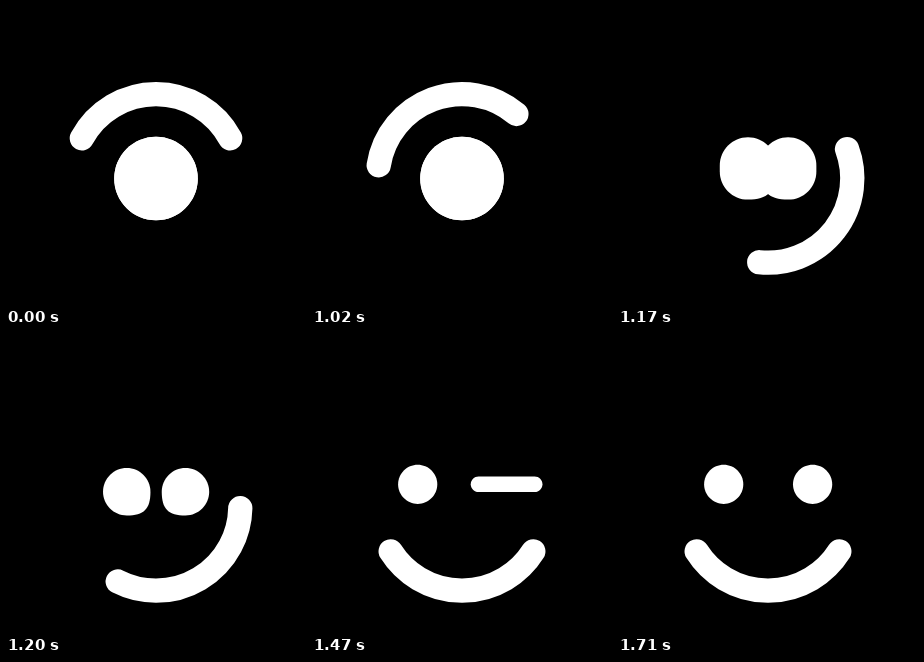
Write an HTML page that moves like this. It is 300 by 300 pixels and loops after 2.7 s.

```html
<!DOCTYPE html>
<html lang="en">
<head>
<meta charset="utf-8">
<title>Smile and wink</title>
<style>
  html, body { margin: 0; width: 100%; height: 100%; overflow: hidden; background: #000; }
  svg { display: block; width: 100%; height: 100%; }
</style>
</head>
<body>
<svg viewBox="0 0 300 300">
  <path id="arc" fill="none" stroke="#fff" stroke-width="24.3" stroke-linecap="round"/>
  <path id="left" fill="#fff"/>
  <path id="right" fill="#fff"/>
</svg>
<script>
const LOOP = 2700, STEP = 30;
const CX = 150, CY = 172.4, RADIUS = 84.3;
const ROUND = 0.552;

const [arc, left, right] = ['arc', 'left', 'right'].map(id => document.getElementById(id));

const span = (t, a, b) => Math.min(1, Math.max(0, (t - a) / (b - a)));
const mix = (a, b, p) => a + (b - a) * p;
const smooth = p => p * p * (3 - 2 * p);
const easeOut = (p, n) => 1 - Math.pow(1 - p, n);
const bump = (t, a, b) => Math.sin(Math.PI * span(t, a, b));

function bezier(x1, y1, x2, y2) {
  const at = (s, a, b) => 3 * (1 - s) * (1 - s) * s * a + 3 * (1 - s) * s * s * b + s * s * s;
  return x => {
    if (x <= 0 || x >= 1) return x <= 0 ? 0 : 1;
    let lo = 0, hi = 1;
    for (let i = 0; i < 30; i++) {
      const mid = (lo + hi) / 2;
      if (at(mid, x1, x2) < x) lo = mid; else hi = mid;
    }
    return at(lo, y1, y2);
  };
}

const swing = bezier(0.8, -0.55, 0.11, 1);

// Degrees run clockwise from the top.
function onArc(deg) {
  const a = deg * Math.PI / 180;
  return `${CX + RADIUS * Math.sin(a)} ${CY - RADIUS * Math.cos(a)}`;
}

function arcPath(turn, half) {
  return `M${onArc(turn - half)}A${RADIUS} ${RADIUS} 0 0 1 ${onArc(turn + half)}`;
}

// A pill whose lower inner corner can bulge; side is 1 for the left eye, -1 for the right.
function eyePath(cx, cy, rx, ry, bulge, side) {
  const r = Math.min(rx, ry), sx = rx - r, sy = ry - r;
  const k = ROUND * r, q = (ROUND + bulge) * r;
  const p = (x, y) => `${cx + side * x} ${cy + y} `;
  return 'M' + p(-sx, -ry) + 'L' + p(sx, -ry) +
    'C' + p(sx + k, -ry) + p(rx, -sy - k) + p(rx, -sy) + 'L' + p(rx, sy) +
    'C' + p(rx, sy + q) + p(sx + q, ry) + p(sx, ry) + 'L' + p(-sx, ry) +
    'C' + p(-sx - k, ry) + p(-rx, sy + k) + p(-rx, sy) + 'L' + p(-rx, -sy) +
    'C' + p(-rx, -sy - k) + p(-sx - k, -ry) + p(-sx, -ry) + 'Z';
}

function draw(t) {
  const turn = 180 * swing(span(t, 915, 1375));
  const half = mix(61.6, 57.8, smooth(span(t, 915, 1230)));
  arc.setAttribute('d', arcPath(turn, half));

  const split = easeOut(span(t, 1125, 1373), 3);
  const size = mix(41.8, 19.6, smooth(span(t, 1055, 1255)));
  const tall = size + 5.8 * bump(t, 1020, 1200);
  const bulge = 0.18 * bump(t, 1125, 1290);
  const gap = 44.3 * split;
  const y = mix(172.5, 150.3, split);

  const wink = t < 1530
    ? easeOut(span(t, 1440, 1530), 4.2)
    : 1 - smooth(span(t, 1530, 1710));

  left.setAttribute('d', eyePath(CX - gap, y, size, tall, bulge, 1));
  right.setAttribute('d', eyePath(CX + gap + 0.3 * split, y,
    mix(size, 39.5, wink), mix(tall, 5.2, wink), bulge, -1));
}

const start = performance.now();
function tick() {
  const t = (performance.now() - start) % LOOP;
  draw(Math.floor(t / STEP) * STEP);
  requestAnimationFrame(tick);
}
tick();
</script>
</body>
</html>
```
